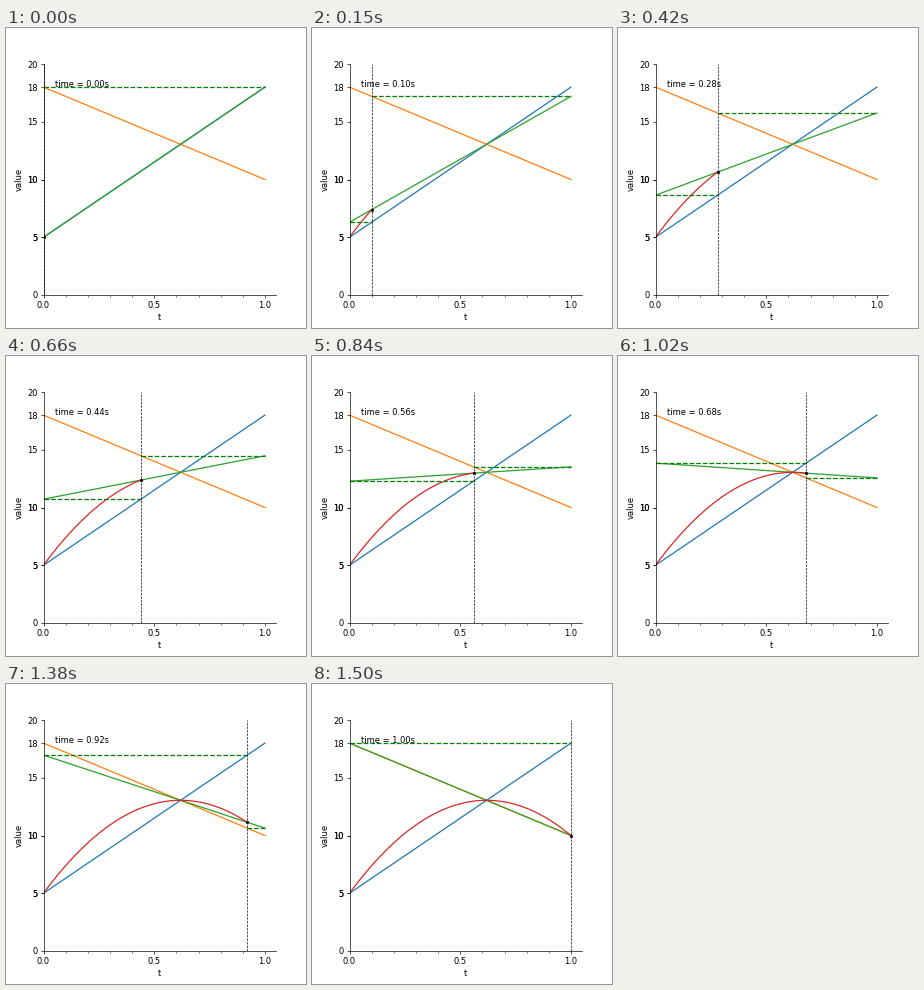
These frames come from a looping animation (300 px wide and 300 px high, 1530 ms). A matplotlib script:

```python
import matplotlib.pyplot as plt
import numpy as np
from matplotlib.animation import FuncAnimation
from matplotlib.ticker import MultipleLocator

FRAMES = 51
INTERVAL = 30
P0, P1, P2 = 5, 18, 10  # control values of the quadratic Bezier curve

plt.rcParams["font.family"] = "DejaVu Sans"


def lerp(a, b, t):
    return a + (b - a) * t


def bezier(t):
    return lerp(lerp(P0, P1, t), lerp(P1, P2, t), t)


fig, ax = plt.subplots(figsize=(5, 5), dpi=60)
ax.set(xlim=(0, 1.05), ylim=(0, 20), xlabel="t", ylabel="value")
ax.set_yticks([0, 5, 10, 15, 20, P0, P1, P2])
ax.xaxis.set_major_locator(MultipleLocator(0.5))
ax.xaxis.set_minor_locator(MultipleLocator(0.1))
ax.spines[["top", "right"]].set_visible(False)

ax.plot([0, 1], [P0, P1], color="C0")
ax.plot([0, 1], [P1, P2], color="C1")
bridge, = ax.plot([], [], color="C2")
curve, = ax.plot([], [], color="C3")
left, = ax.plot([], [], "--", color="green")
right, = ax.plot([], [], "--", color="green")
cursor = ax.axvline(0, color="black", linestyle="--", linewidth=0.8)
dot, = ax.plot([], [], ".", color="black", markersize=6, alpha=0.8)
label = ax.text(0.05, 18, "")


def update(frame):
    t = frame / (FRAMES - 1)
    a, b = lerp(P0, P1, t), lerp(P1, P2, t)
    past = np.arange(frame + 1) / (FRAMES - 1)
    bridge.set_data([0, 1], [a, b])
    curve.set_data(past, bezier(past))
    left.set_data([0, t], [a, a])
    right.set_data([t, 1], [b, b])
    cursor.set_xdata([t, t])
    dot.set_data([t], [bezier(t)])
    label.set_text(f"time = {t:.2f}s")
    return bridge, curve, left, right, cursor, dot, label


anim = FuncAnimation(fig, update, frames=FRAMES, interval=INTERVAL,
                     repeat=True, repeat_delay=0, blit=False)
plt.show()
```
